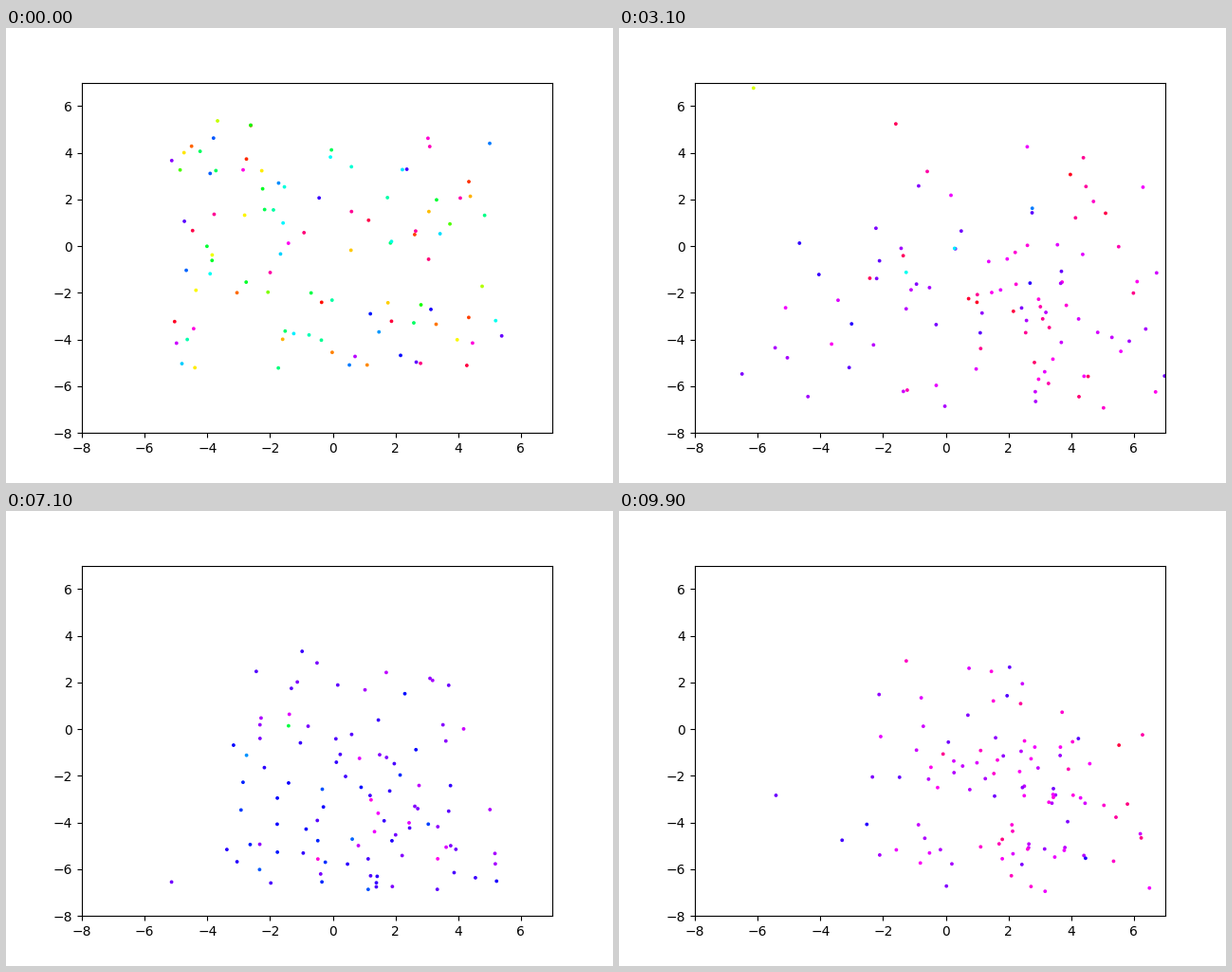
A matplotlib script that plays this animation: 640 px wide and 480 px high, repeating every 10000 ms.

```python
import numpy as np
import matplotlib.pyplot as plt
from matplotlib.animation import FuncAnimation

N, STEPS, INTERVAL = 100, 100, 100
BOX = 7.0        # particles beyond this half-width re-enter
SPEED = 0.27     # distance per step
ALIGN = 0.1      # pull towards the common heading
NOISE = 0.15     # random turn per step, radians

# Common heading of the swarm, in degrees, over the loop
KEY_STEPS = [0, 35, 45, 60, 78, 92]
KEY_DEGREES = [304, 302, 258, 252, 290, 306]


def simulate():
    """Return positions and headings of all particles for every step."""
    rng = np.random.default_rng(11)
    pos = rng.uniform(-5.4, 5.4, (N, 2))
    angle = rng.uniform(0, 2 * np.pi, N)
    common = np.radians(np.interp(range(STEPS), KEY_STEPS, KEY_DEGREES))
    history = []
    for goal in common:
        history.append((pos.copy(), angle % (2 * np.pi)))
        angle = angle + ALIGN * np.sin(goal - angle) + rng.normal(0, NOISE, N)
        pos = pos + SPEED * np.column_stack([np.cos(angle), np.sin(angle)])
        gone = (np.abs(pos) > BOX).any(axis=1)
        pos[gone] = rng.uniform(-2.8, 4.0, (gone.sum(), 2))
    return history


history = simulate()

fig, ax = plt.subplots(figsize=(6.4, 4.8), dpi=100)
ax.set_xlim(-8, 7)
ax.set_ylim(-8, 7)
start_pos, start_angle = history[0]
dots = ax.scatter(*start_pos.T, c=start_angle, s=3, cmap="hsv",
                  vmin=0, vmax=2 * np.pi)


def update(step):
    pos, angle = history[step]
    dots.set_offsets(pos)
    dots.set_array(angle)
    return (dots,)


anim = FuncAnimation(fig, update, frames=STEPS, interval=INTERVAL,
                     repeat=True, repeat_delay=0)
plt.show()
```
